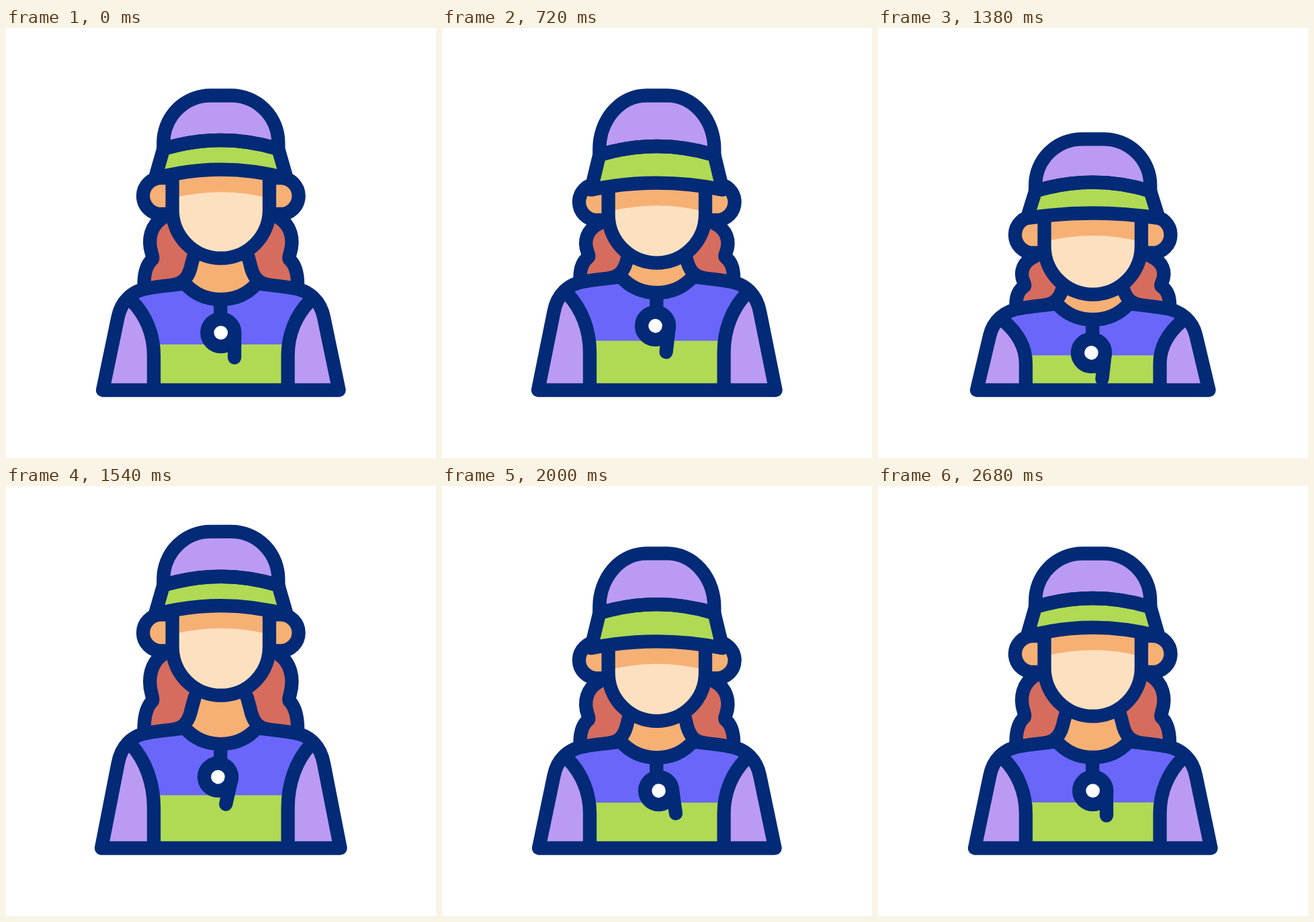
Write an HTML page that moves like this. It is 640 by 640 pixels and loops after 2800 ms.

```html
<!DOCTYPE html>
<html lang="en">
<head>
<meta charset="utf-8">
<title>Bouncing coach</title>
<style>
html, body { margin: 0; width: 100%; height: 100%; overflow: hidden; background: #fff; }
svg { display: block; width: 100vw; height: 100vh; }
.line { fill: none; stroke: #022a76; stroke-width: 20.3; stroke-linecap: round; stroke-linejoin: round; }
.butt { stroke-linecap: butt; }
</style>
</head>
<body>
<svg id="stage" viewBox="0 0 640 640"></svg>
<script>
const LOOP = 2800, START = 220, DIP = 1380, END = 2680;
const CX = 319.8, BASE = 539;
const C = {
  purple: '#bb9af3', green: '#b0da53', orange: '#f7b074',
  skin: '#fde0c0', hair: '#d66c5d', blue: '#6a66f9'
};
const svg = document.getElementById('stage');

// Extremes of a decaying bounce: equal steps, alternating sign.
const bounce = (time, step, size, ratio, count = 4) =>
  Array.from({ length: count }, (_, i) => [time + i * step, size * (-ratio) ** i]);

// Swings smoothly from one extreme to the next, at rest outside them.
function motion(...mid) {
  const keys = [[START, 0], ...mid, [END, 0]];
  return t => {
    const i = keys.findIndex(k => k[0] > t);
    if (i < 1) return 0;
    const [t0, a] = keys[i - 1], [t1, b] = keys[i];
    return a + (b - a) * (1 - Math.cos(Math.PI * (t - t0) / (t1 - t0))) / 2;
  };
}

// Two hops with a deep dip between them; the head trails the body.
const body = motion(...bounce(365, 180, -32, .56), [DIP, 30], ...bounce(1535, 295, -20, .56));
const head = motion(...bounce(390, 205, -45, .48), [DIP, 54], ...bounce(1540, 285, -31, .48));
const nod = motion([360, 0], ...bounce(500, 220, -.8, 1.25, 2), [900, 0], [DIP, 0], [1540, 0],
  ...bounce(1720, 280, -.9, 1.15, 2), [2280, -.4]);
const swing = motion([360, 0], ...bounce(720, 330, 6.5, 1, 3), ...bounce(1720, 280, 20, .41));

function add(tag, attrs, parent = svg) {
  const el = document.createElementNS('http://www.w3.org/2000/svg', tag);
  for (const k in attrs) el.setAttribute(k, attrs[k]);
  return parent.appendChild(el);
}
const fill = (color, parent) => add('path', { fill: color }, parent);
const line = (parent, cls = 'line') => add('path', { class: cls }, parent);
const flip = `matrix(-1 0 0 1 ${2 * CX} 0)`;
const sides = () => [add('g', {}), add('g', { transform: flip })];
const set = (el, d) => el.setAttribute('d', d);

// Parts in painting order, back to front.
const hair = sides().map(g => [fill(C.hair, g), line(g)]);
const neck = fill(C.orange);
const neckSide = sides().map(g => line(g));
const torso = fill(C.blue), stripe = fill(C.green);
const sleeve = sides().map(g => [fill(C.purple, g), line(g)]);
const outline = line();
const ear = sides().map(g => [fill(C.orange, g), line(g)]);
const face = fill(C.skin), shade = fill(C.orange), jaw = line();
const crown = fill(C.purple), band = fill(C.green);
const crownLine = line(), bandLine = line();
const stem = line(svg, 'line butt');
const whistle = add('g', {});
add('circle', { cx: CX, cy: 453.5, r: 20.5, class: 'line', style: 'fill:#fff' }, whistle);
add('path', { d: `M${CX + 20.3} 453V490.5`, class: 'line' }, whistle);

function draw(t) {
  const b = body(t), h = head(t), n = nod(t);
  const q = h * (h > 0 ? .2 : .05);
  const R = x => 2 * CX - x;
  // Shoulders move as one piece, the trunk below stretches.
  const Y = y => y + b * Math.min(1, (BASE - y) / 125);

  // head heights
  const chin = h + 7 * n, lobe = h + .35 * q + 9 * n;
  const top = 100.5 + h + q;
  const mid = 167 + h + .8 * q + 9 * n, midEnd = mid + 13;
  const brim = 210.7 + h + q + 20 * n;
  const flat = (n < 0 ? 10 * n : -3 * n) - .5 * Math.max(q, 0);
  const brimEnd = brim + 13 + flat;
  const jawY = 270.5 + chin;

  // hair hangs between the ears and the shoulders
  const H = y => y + lobe + (b - lobe) * (y - 282) / 98;
  const lock = `M234 ${H(282)}C216 ${H(293)} 210 ${H(314)} 217 ${H(336)}`
    + `Q219 ${H(342)} 218 ${H(344)}C209 ${H(352)} 205.5 ${H(364)} 205.5 ${H(382)}`;
  for (const [f, l] of hair) {
    set(f, `${lock}L215 ${Y(389)}L285 ${Y(386)}V${H(282)}Z`);
    set(l, lock);
  }

  // neck and body
  const collar = `C280 ${Y(396)} 299 ${Y(404)} ${CX} ${Y(404)}`
    + `C${R(299)} ${Y(404)} ${R(280)} ${Y(396)} ${R(266)} ${Y(380)}`;
  set(neck, `M281 ${Y(334)}L276 ${Y(352)}L266 ${Y(380)}${collar}L${R(276)} ${Y(352)}L${R(281)} ${Y(334)}Z`);
  for (const l of neckSide) {
    set(l, `M281 ${Y(334)}L276.5 ${Y(350)}C273 ${Y(368)} 266 ${Y(380)} 250 ${Y(382)}`);
  }

  const foot = 144 + .1 * b;
  const shoulder = `C247 ${Y(383)} 230 ${Y(384)} 214 ${Y(387)}`
    + `C187 ${Y(390)} 171 ${Y(408)} 166.5 ${Y(431)}L${foot} ${BASE}`;
  const back = `L${R(166.5)} ${Y(431)}C${R(171)} ${Y(408)} ${R(187)} ${Y(390)} ${R(214)} ${Y(387)}`
    + `C${R(230)} ${Y(384)} ${R(247)} ${Y(383)} ${R(266)} ${Y(380)}`;
  const whole = `M266 ${Y(380)}${shoulder}H${R(foot)}${back}`;
  set(torso, `${whole}C${R(280)} ${Y(396)} ${R(299)} ${Y(404)} ${CX} ${Y(404)}`
    + `C299 ${Y(404)} 280 ${Y(396)} 266 ${Y(380)}Z`);
  set(stripe, `M220 ${Y(471)}H${R(220)}V${BASE}H220Z`);
  const seam = `M220 ${BASE - 3}V${Y(487)}C220 ${Y(456)} 208 ${Y(427)} 187 ${Y(406)}`;
  for (const [f, l] of sleeve) {
    set(f, `${seam}Q171 ${Y(412)} 166.5 ${Y(431)}L${foot} ${BASE}H220Z`);
    set(l, seam);
  }
  set(outline, `${whole}M266 ${Y(380)}${collar}M${foot} ${BASE}H${R(foot)}`);

  // face and ears
  const lobeD = `M247.6 ${223 + lobe}H231A27 27 0 0 0 231 ${277 + lobe}H247.6`;
  for (const [f, l] of ear) {
    set(f, lobeD + 'Z');
    set(l, lobeD);
  }
  const jawD = `M247.6 ${brim + 10}V${jawY}A72.2 72.2 0 0 0 ${R(247.6)} ${jawY}V${brim + 10}`;
  set(face, jawD + 'Z');
  set(jaw, jawD);
  const edge = brim + 33.5;
  set(shade, `M248 ${brim}V${edge + 9}Q${CX} ${edge - 9} ${R(248)} ${edge + 9}V${brim}Z`);

  // hat
  const ry = Math.max(midEnd - 9 - top, 20);
  const arch = `Q${CX} ${mid - 13}`;
  const domeD = `M234.3 ${midEnd}V${top + ry}A70 ${ry} 0 0 1 304.3 ${top}H${R(304.3)}`
    + `A70 ${ry} 0 0 1 ${R(234.3)} ${top + ry}V${midEnd}${arch} 234.3 ${midEnd}Z`;
  const brimD = `M234.3 ${midEnd}${arch} ${R(234.3)} ${midEnd}`
    + `L${R(221.8)} ${brimEnd}Q${CX} ${2 * brim - brimEnd} 221.8 ${brimEnd}Z`;
  set(crown, domeD);
  set(crownLine, domeD);
  set(band, brimD);
  set(bandLine, brimD);

  // whistle hangs from the collar
  set(stem, `M${CX - .5} ${404 + b}V${435 + b}`);
  whistle.setAttribute('transform', `translate(0 ${b}) rotate(${swing(t)} ${CX} 434)`);
}

function tick() {
  draw(performance.now() % LOOP);
  requestAnimationFrame(tick);
}
tick();
</script>
</body>
</html>
```
